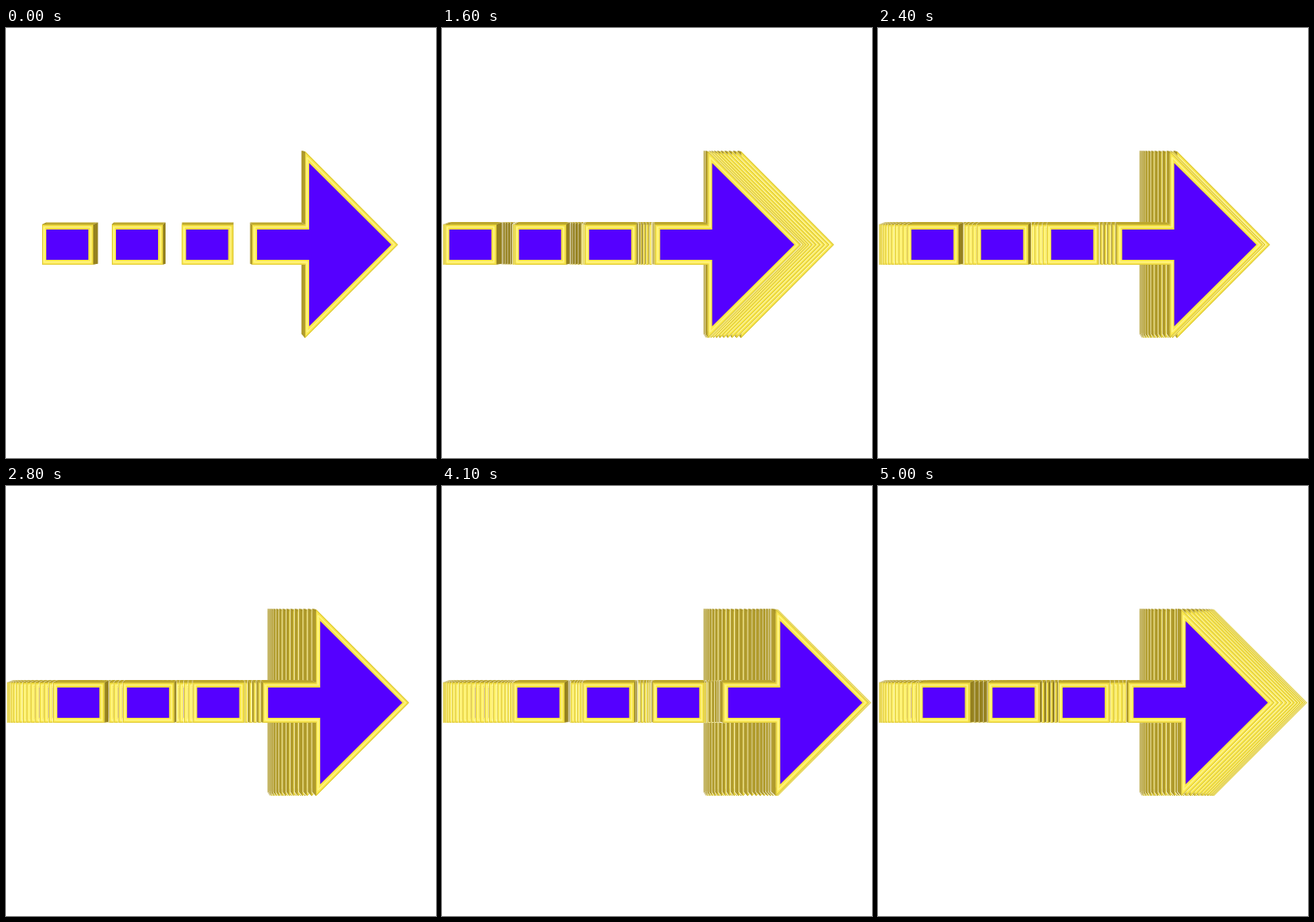
An HTML page with a canvas for the animation above (5100 ms loop, 512 px wide and 512 px high).

```html
<!DOCTYPE html>
<html lang="en">
<head>
<meta charset="utf-8">
<title>Arrow</title>
<style>
html, body { margin: 0; width: 100%; height: 100%; overflow: hidden; background: #fff; }
canvas { display: block; width: 512px; height: 512px; }
</style>
</head>
<body>
<canvas id="stage" width="512" height="512"></canvas>
<script>
const ctx = document.getElementById('stage').getContext('2d');
const LOOP = 5100, STEP = 100, COUNT = 50;
const FILL = '#5500ff', YELLOW = '#fdeb52', SHINE = '#fff582', RIM = '#d9c537';

// Vertices run clockwise: [x, y, side x, side y]; sides push the back outline outwards.
const block = x => ({
  outer: [[x, 234, -1, -1], [x + 61, 234, 1, -1], [x + 61, 281.6, 1, 1], [x, 281.6, -1, 1]],
  inner: [[x + 5, 240], [x + 55, 240], [x + 55, 276], [x + 5, 276]]
});
const arrow = {
  outer: [[293, 234, -1, -1], [356, 234, -1, -1], [356, 147, -1, -1], [466.5, 258, 0, 0],
          [356, 369, -1, -1], [356, 281.6, -1, 1], [293, 281.6, -1, 1]],
  inner: [[299, 240], [361, 240], [361, 161], [458.7, 258], [361, 355], [361, 276], [299, 276]]
};
const shapes = [block(43), block(126), block(209.5), arrow];

function path(points) {
  ctx.beginPath();
  points.forEach(p => ctx.lineTo(p[0], p[1]));
  ctx.closePath();
}

function paint(points, color) {
  path(points);
  ctx.fillStyle = color;
  ctx.fill();
}

function outline(points, color, width) {
  path(points);
  ctx.strokeStyle = color;
  ctx.lineWidth = width;
  ctx.stroke();
}

const backPoint = ([x, y, sx, sy]) =>
  [x + 0.03 * (250 - x) + 1.1 * sx, y + 0.02 * (180 - y) + 1.3 * sy];

function wallColor(dx, dy) {
  if (dx === 0) return dy > 0 ? '#95811f' : '#b09b2c';
  return dy === 0 && dx > 0 ? '#bda82d' : '#a8942a';
}

function bevelColor(dx, dy) {
  if (dx === 0) return dy > 0 ? '#f6e248' : '#ffee5e';
  if (dy === 0) return dx > 0 ? '#f3de42' : '#ffec58';
  return dx > 0 ? '#f9e64c' : '#fbe94e';
}

function drawShape(shape, shift) {
  const move = p => [p[0] + shift, ...p.slice(1)];
  const outer = shape.outer.map(move), inner = shape.inner.map(move);
  const back = outer.map(backPoint);
  const edges = outer.map((a, i) => {
    const j = (i + 1) % outer.length, b = outer[j];
    return {
      dx: b[0] - a[0], dy: b[1] - a[1],
      wall: [a, b, back[j], back[i]],
      bevel: [a, b, inner[j], inner[i]]
    };
  });

  // A pale fringe on the sides separates each copy from the trail below it.
  edges.filter(e => e.dy !== 0).forEach(e => outline(e.wall, 'rgba(255,255,255,.65)', 1.5));
  edges.forEach(e => paint(e.wall, wallColor(e.dx, e.dy)));

  paint(outer, YELLOW);
  edges.forEach(e => paint(e.bevel, bevelColor(e.dx, e.dy)));
  const middle = outer.map((p, i) => [(p[0] + inner[i][0]) / 2, (p[1] + inner[i][1]) / 2]);
  outline(middle, SHINE, 1.6);
  ctx.save();
  path(outer);
  ctx.clip();
  outline(outer, RIM, 1.6);
  ctx.restore();
  outline(inner, '#e2cd3a', 1);
  paint(inner, FILL);
}

function shiftAt(n) {
  const a = 2 * Math.PI * n / COUNT;
  return 1.25 * (1 - Math.cos(a)) - 43 * Math.sin(a);
}

let shown = -1;
function render(now) {
  const n = Math.max(0, Math.floor((now % LOOP) / STEP) - 1);
  if (n !== shown) {
    shown = n;
    ctx.fillStyle = '#fff';
    ctx.fillRect(0, 0, 512, 512);
    for (let i = 0; i <= n; i++) {
      const shift = shiftAt(i);
      shapes.forEach(s => drawShape(s, shift));
    }
  }
}

ctx.lineJoin = 'bevel';
const start = performance.now();
function tick() {
  render(performance.now() - start);
  requestAnimationFrame(tick);
}
tick();
</script>
</body>
</html>
```
